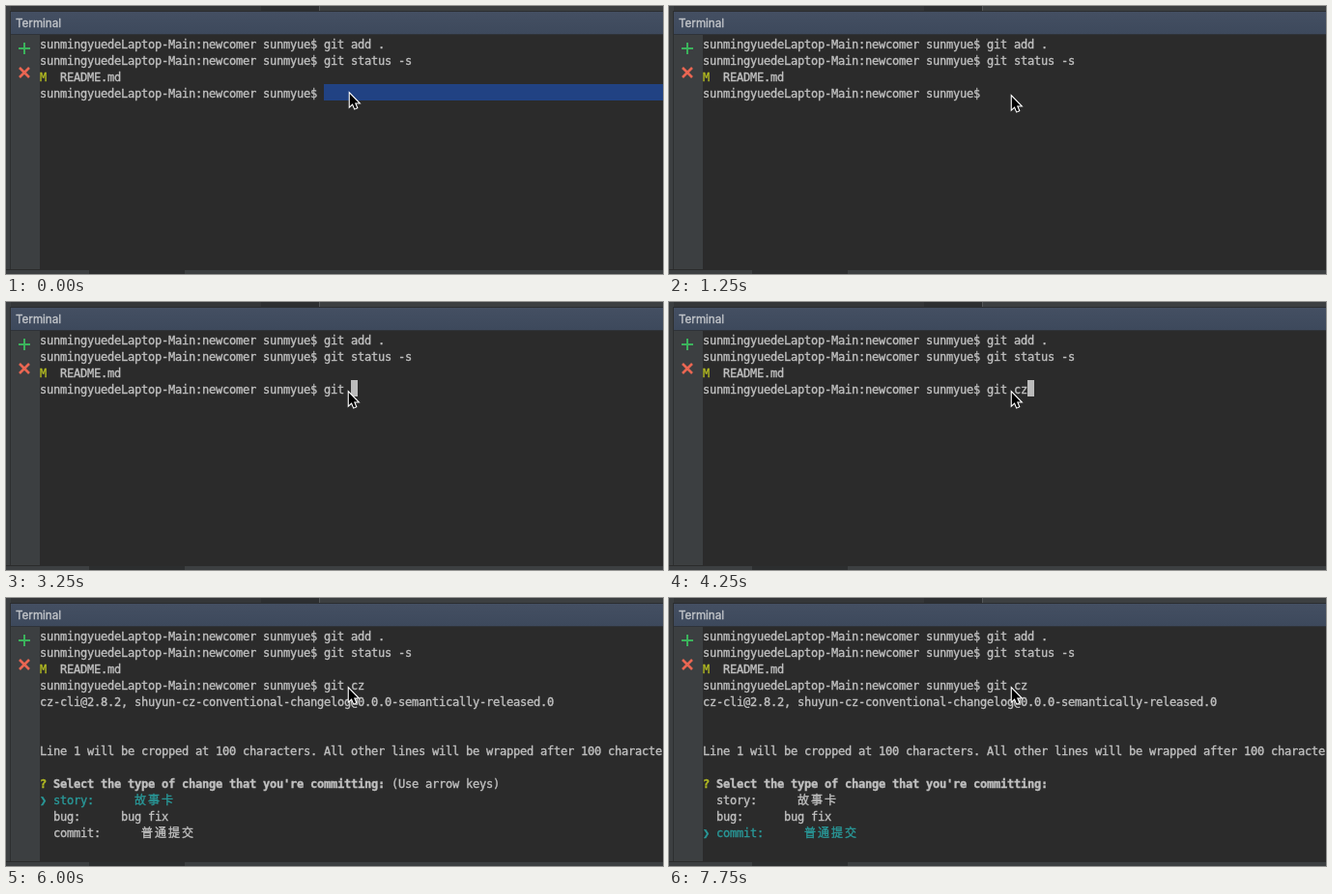
Animation, 680 px wide and 278 px high, one loop 8000 ms. Source, as an HTML page with a canvas:

```html
<!DOCTYPE html>
<html lang="en">
<head>
<meta charset="utf-8">
<title>Terminal</title>
<style>
html, body { margin: 0; width: 680px; height: 278px; overflow: hidden; background: #2b2b2b; }
canvas { display: block; }
</style>
</head>
<body>
<canvas id="stage" width="680" height="278"></canvas>
<script>
const ctx = document.getElementById('stage').getContext('2d');
const LOOP = 8000, LEFT = 35, TOP = 30, CELL = 7, ROW = 17;
const GREY = '#c0c0c0', YELLOW = '#b2ba22', CYAN = '#299999';
const PROMPT = 'sunmingyuedeLaptop-Main:newcomer sunmyue$ ';
const COMMAND = 'git cz';

// [start, typed characters, block cursor visible]
const typing = [
  [0, 0, false], [500, 0, true], [1000, 0, false], [1500, 0, true], [2000, 0, false],
  [2250, 1, true], [2500, 2, true], [2750, 3, true], [3250, 4, true], [3750, 4, false],
  [4000, 5, true], [4250, 6, true], [5250, 6, false]
];
const pointer = [[0, 355, 90], [1000, 355, 92], [1250, 354, 93]];
const options = [['story:', 14, '故事卡'], ['bug:', 12, 'bug fix'], ['commit:', 15, '普通提交']];

const latest = (steps, t) => steps.filter(step => step[0] <= t).pop();

function rect(x, y, w, h, color) {
  ctx.fillStyle = color;
  ctx.fillRect(x, y, w, h);
}

function line(color, width, ...segments) {
  ctx.strokeStyle = color;
  ctx.lineWidth = width;
  ctx.beginPath();
  for (const [x1, y1, x2, y2] of segments) {
    ctx.moveTo(x1, y1);
    ctx.lineTo(x2, y2);
  }
  ctx.stroke();
}

// A hairline outline gives the slightly heavy look of smoothed text.
function heavyText(text, x, y, color) {
  ctx.fillStyle = ctx.strokeStyle = color;
  ctx.lineWidth = 0.35;
  ctx.fillText(text, x, y);
  ctx.strokeText(text, x, y);
}

// Each character sits on the terminal grid; wide ones take two cells.
function write(row, col, text, color = GREY, weight = '') {
  ctx.font = weight + ' 12px "DejaVu Sans Mono", "Noto Sans CJK SC", "Noto Sans CJK", monospace';
  for (const char of text) {
    heavyText(char, LEFT + col * CELL, TOP + row * ROW + 14, color);
    col += char >= '\u3000' ? 2 : 1;
  }
}

function block(row, col) {
  rect(LEFT + col * CELL, TOP + row * ROW, CELL, ROW, '#bbbbbb');
}

function drawWindow() {
  rect(0, 0, 680, 278, '#3c3f41');
  rect(5, 0, 259, 5, '#343638');
  rect(264, 0, 61, 5, '#2d2f31');
  rect(324, 0, 1, 5, '#55585a');
  rect(4, 5, 676, 1, '#2b2d30');
  const header = ctx.createLinearGradient(0, 6, 0, 29);
  header.addColorStop(0, '#444f62');
  header.addColorStop(1, '#3d495c');
  rect(5, 6, 675, 23, header);
  rect(5, 29, 675, 1, '#2f3339');
  rect(35, 30, 645, 243, '#2b2b2b');
  rect(4, 6, 1, 268, '#2d2f30');
  rect(0, 273, 680, 1, '#2b2b2b');
  rect(86, 274, 99, 4, '#2c2e2f');

  ctx.font = '11.6px Inter, sans-serif';
  heavyText('Terminal', 10, 22, '#c3c6ca');
  line('#3bb35c', 2, [13, 44, 25, 44], [19, 38, 19, 50]);
  line('#ea6652', 2.6, [14, 64, 24, 74], [24, 64, 14, 74]);
}

function drawMenu(t) {
  const selected = t < 7500 ? 0 : t < 7750 ? 1 : 2;
  write(4, 0, 'cz-cli@2.8.2, shuyun-cz-conventional-changelog@0.0.0-semantically-released.0');
  write(7, 0, 'Line 1 will be cropped at 100 characters. All other lines will be wrapped after 100 characters.');
  write(9, 0, '?', YELLOW, 'bold');
  write(9, 2, "Select the type of change that you're committing:", GREY, 'bold');
  if (selected === 0) write(9, 52, '(Use arrow keys)');
  options.forEach(([name, col, label], i) => {
    const color = i === selected ? CYAN : GREY;
    if (i === selected) write(10 + i, 0, '❯', color);
    write(10 + i, 2, name, color);
    write(10 + i, col, label, color);
  });
}

function drawPointer(x, y) {
  const arrow = new Path2D('M0 0V13L3 10.2L5.2 15.4L7.3 14.5L5.2 9.4H9.2Z');
  ctx.save();
  ctx.translate(x + 0.8, y + 1);
  ctx.lineWidth = 2.2;
  ctx.strokeStyle = '#fff';
  ctx.stroke(arrow);
  ctx.fillStyle = '#000';
  ctx.fill(arrow);
  ctx.restore();
}

function draw(t) {
  drawWindow();
  if (t < 1250) rect(329, 81, 351, ROW, '#214283');
  write(0, 0, PROMPT + 'git add .');
  write(1, 0, PROMPT + 'git status -s');
  write(2, 0, 'M', YELLOW);
  write(2, 3, 'README.md');

  const [, typed, cursor] = latest(typing, t);
  write(3, 0, PROMPT + COMMAND.slice(0, typed));
  if (cursor) block(3, PROMPT.length + typed);
  if (t >= 6000) drawMenu(t);
  else if (t >= 5750) block(4, 0);

  const [, x, y] = latest(pointer, t);
  drawPointer(x, y);
}

function frame() {
  draw(performance.now() % LOOP);
  requestAnimationFrame(frame);
}
frame();
</script>
</body>
</html>
```
